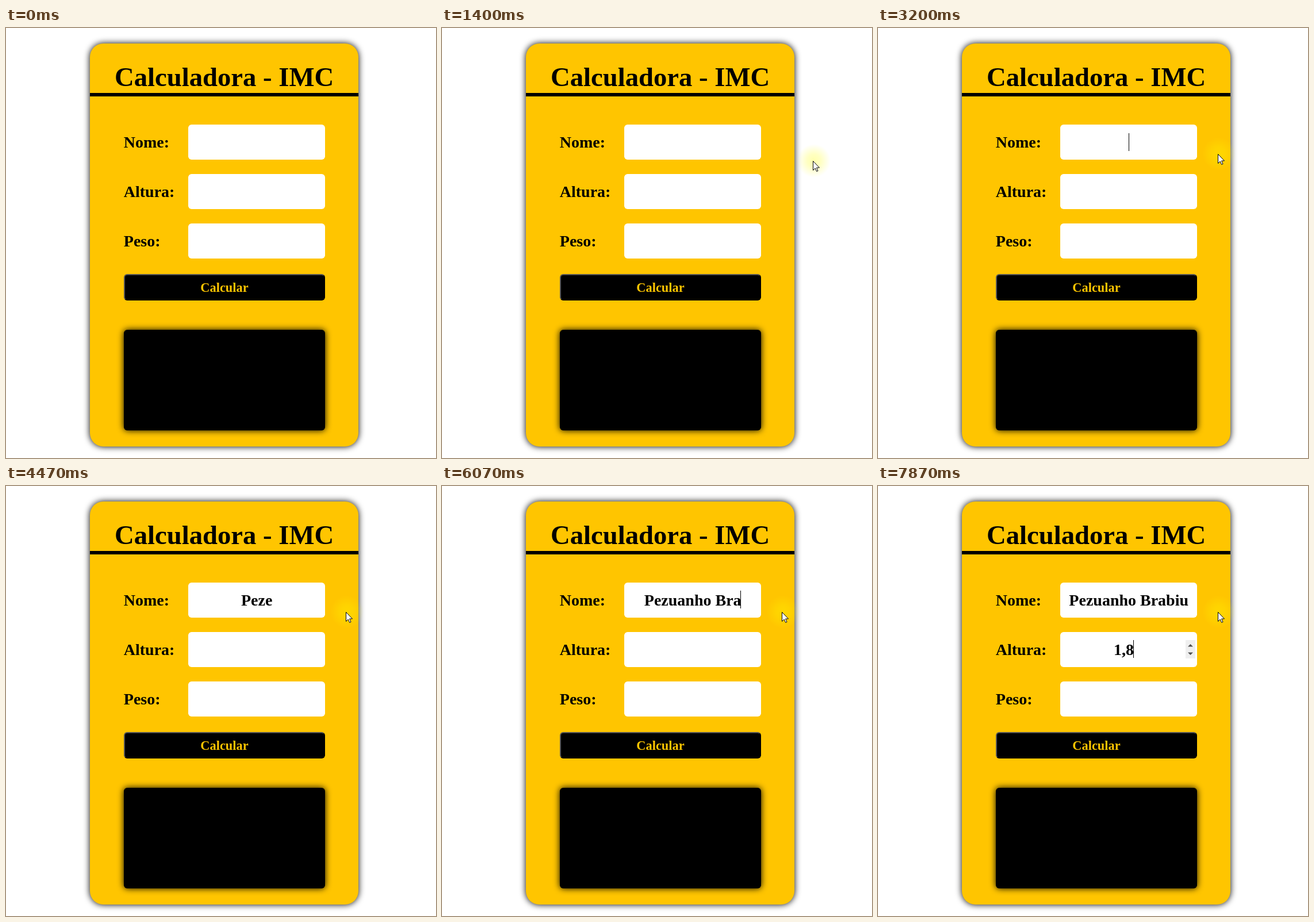
An HTML page for the animation above (8000 ms loop, 748 by 748 pixels).

```html
<!DOCTYPE html>
<html lang="pt">
<head>
<meta charset="utf-8">
<title>Calculadora - IMC</title>
<style>
  html, body { margin: 0; width: 100%; height: 100%; overflow: hidden; background: #fff; }
  .box { position: absolute; box-sizing: border-box; border-radius: 5.84px; }
  .card { left: 146px; top: 27px; width: 467.2px; height: 700.8px; border-radius: 23.4px; background: #ffc500; box-shadow: 0 0 11.7px #000; }
  .rule { left: 146px; top: 113px; width: 467.2px; height: 6px; border-radius: 0; background: #000; }
  .field { left: 317px; width: 238.4px; height: 61px; background: #fff; }
  .button { left: 204.8px; top: 427.5px; width: 350.6px; height: 46.5px; background: #000; border: 2px outset #000; }
  .result { left: 204.8px; top: 524.5px; width: 350.6px; height: 175.5px; background: #000; box-shadow: 0 0 11.7px #000; }
  svg { position: absolute; left: 0; top: 0; }
  text { font: bold 28px "Liberation Serif", "Times New Roman", serif; white-space: pre; }
  .typed { text-anchor: middle; font-kerning: none; }
</style>
</head>
<body>
<div class="box card"></div>
<div class="box rule"></div>
<div class="box field" style="top:168px"></div>
<div class="box field" style="top:254px"></div>
<div class="box field" style="top:340px"></div>
<div class="box button"></div>
<div class="box result"></div>

<svg width="748" height="748" viewBox="0 0 748 748">
  <defs>
    <radialGradient id="glow">
      <stop offset="0" stop-color="#ff0" stop-opacity=".32"/>
      <stop offset=".4" stop-color="#ff0" stop-opacity=".24"/>
      <stop offset="1" stop-color="#ff0" stop-opacity="0"/>
    </radialGradient>
  </defs>
  <text x="189" y="100.5" style="font-size:46.7px">Calculadora - IMC</text>
  <text x="204.8" y="208">Nome:</text>
  <text x="204.8" y="294">Altura:</text>
  <text x="204.8" y="380">Peso:</text>
  <text x="380" y="458.5" text-anchor="middle" fill="#ffc500" style="font-size:22.4px">Calcular</text>

  <text id="name" class="typed" x="436.2" y="208"></text>
  <text id="height" class="typed" x="427.5" y="294"></text>
  <g id="spinner">
    <rect x="535" y="268" width="17" height="32" fill="#efefef"/>
    <path d="M539 279.5h9l-4.5-4.5zM539 289.5h9l-4.5 4.5z" fill="#505050"/>
  </g>
  <rect id="caret" width="1" height="31"/>

  <g id="pointer">
    <circle cx="2" r="29" fill="url(#glow)"/>
    <circle id="press" fill="none" stroke="#e03c28" stroke-width="2.5"/>
    <circle id="release" fill="none" stroke="#3c8ce0" stroke-width="2"/>
    <path id="arrow" d="M.5.5V16.5L4.2 13 6.7 18.5 9 17.5 6.6 12H11.5Z" fill="#fff" stroke="#000"/>
    <path id="beam" d="M-.5 -6.5H2M3 -6.5H5.5M2.5 -6V6M-.5 7H2M3 7H5.5" fill="none" stroke="#000"/>
  </g>
</svg>

<script>
const $ = id => document.getElementById(id);
const TICK = 200 / 3, LOOP = 8000, BLINK = 8;
const FOCUS_NAME = 32, FOCUS_HEIGHT = 100, CLICK = 30;

// [tick, text]
const nameKeys = [
  [55, "P"], [56, "Pe"], [58, "Pez"], [59, "Peze"], [69, "Pez"],
  [74, "Pezu"], [75, "Pezua"], [77, "Pezuan"], [78, "Pezuanh"], [80, "Pezuanho"], [81, "Pezuanho "],
  [87, "Pezuanho B"], [89, "Pezuanho Br"], [91, "Pezuanho Bra"],
  [93, "Pezuanho Brab"], [94, "Pezuanho Brabi"], [96, "Pezuanho Brabiu"]
];
const heightKeys = [[109, "1"], [113, "1,"], [118, "1,8"]];

// [tick, x, y]
const path = [
  [7, 6, 296], [11, 150, 262], [15, 350, 212], [17, 450, 203], [19, 549, 223],
  [20, 612, 224], [21, 645, 231], [22, 650, 241], [23, 633, 226], [24, 633, 226],
  [25, 615, 222], [28, 560, 212], [30, 532, 208], [31, 530, 208], [37, 530, 208],
  [38, 556, 212], [39, 582, 217], [40, 591, 219]
];

const lastKey = (keys, tick, start) =>
  keys.reduce((found, key) => key[0] <= tick ? key : found, [start, ""]);

function pointAt(tick) {
  const next = path.findIndex(p => p[0] > tick);
  if (next < 0) return path[path.length - 1].slice(1);
  const [t0, x0, y0] = path[next - 1], [t1, x1, y1] = path[next];
  const k = (tick - t0) / (t1 - t0);
  return [x0 + (x1 - x0) * k, y0 + (y1 - y0) * k];
}

const show = (el, visible) => el.setAttribute("visibility", visible ? "inherit" : "hidden");

function drawRing(el, age) {
  show(el, age > 0 && age < 6);
  el.setAttribute("r", Math.max(0, age * 3.2));
  el.setAttribute("opacity", Math.max(0, 1.1 - age / 6));
}

function drawPointer(tick) {
  show($("pointer"), tick >= path[0][0]);
  if (tick < path[0][0]) return;
  const [x, y] = pointAt(tick);
  const inField = x > 317 && x < 555 && y > 168 && y < 229;
  $("pointer").setAttribute("transform", `translate(${Math.round(x)} ${Math.round(y)})`);
  show($("arrow"), !inField);
  show($("beam"), inField);
  drawRing($("press"), tick - CLICK);
  drawRing($("release"), tick - CLICK - .6);
}

function drawCaret(tick, field, [since, text], top) {
  const on = tick >= FOCUS_NAME && Math.floor((tick - since) / BLINK) % 2 === 0;
  const center = field.x.baseVal[0].value;
  const x = text ? center + field.getComputedTextLength() / 2 - 1 : center;
  show($("caret"), on);
  $("caret").setAttribute("x", Math.floor(x));
  $("caret").setAttribute("y", text ? top : top + 1);
}

function draw(ms) {
  const tick = Math.floor((ms % LOOP + 4) / TICK) % 120;
  const name = lastKey(nameKeys, tick, FOCUS_NAME);
  const height = lastKey(heightKeys, tick, FOCUS_HEIGHT);
  $("name").textContent = name[1];
  $("height").textContent = height[1];
  const onHeight = tick >= FOCUS_HEIGHT;
  show($("spinner"), onHeight);
  if (onHeight) drawCaret(tick, $("height"), height, 268);
  else drawCaret(tick, $("name"), name, 182);
  drawPointer(tick);
}

let start;
function frame(now) {
  start ??= now;
  draw(now - start);
  requestAnimationFrame(frame);
}
draw(0);
requestAnimationFrame(frame);
</script>
</body>
</html>
```
